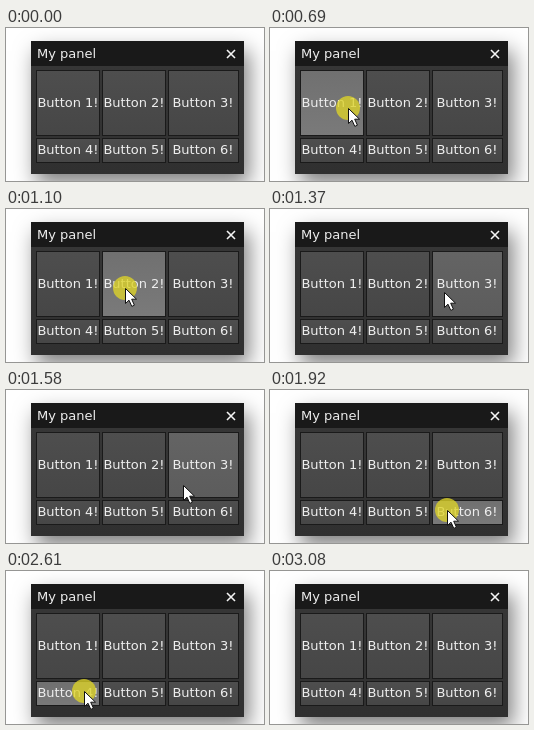
An HTML page with a canvas that plays this animation: 258 px wide and 153 px high, repeating every 3890 ms.

```html
<!DOCTYPE html>
<html lang="en">
<head>
<meta charset="utf-8">
<title>Button panel</title>
<style>
html, body { margin: 0; width: 100%; height: 100%; overflow: hidden; background: #fff; }
canvas { display: block; }
</style>
</head>
<body>
<canvas id="stage" width="258" height="153"></canvas>
<script>
const ctx = document.getElementById('stage').getContext('2d');
const LOOP = 3890;
const COLS = [[30, 64], [96, 64], [162, 71]];
const ROWS = [[42, 66], [110, 25]];
const buttons = ROWS.flatMap(([y, h], r) =>
  COLS.map(([x, w], c) => ({ x, y, w, h, label: `Button ${r * 3 + c + 1}!` })));

// Fill gradients: idle, hover, pressed
const FILLS = [['#4e4e4e', '#464646'], ['#646464', '#5c5c5c'], ['#707070', '#7a7a7a']];
const HOVER = 1, PRESS = 2, CLICK = 3;

// Pointer poses: start time, tip x, tip y, state (0 = pointer away)
const POSES = [
  [0, 0, 0, 0],
  [280, 89, 103, HOVER], [350, 82, 87, HOVER], [420, 78, 80, HOVER],
  [690, 78, 80, CLICK], [760, 78, 80, HOVER],
  [830, 98, 80, HOVER], [900, 118, 79, HOVER], [970, 119, 79, HOVER],
  [1040, 119, 79, CLICK], [1110, 119, 79, PRESS], [1170, 121, 79, HOVER],
  [1240, 145, 80, HOVER], [1310, 166, 82, HOVER], [1370, 174, 83, HOVER],
  [1440, 176, 83, CLICK], [1510, 176, 83, HOVER],
  [1580, 177, 95, HOVER], [1650, 177, 112, HOVER], [1720, 177, 120, HOVER],
  [1920, 177, 120, CLICK], [1990, 176, 120, HOVER],
  [2060, 156, 120, HOVER], [2130, 130, 120, HOVER], [2190, 118, 120, PRESS],
  [2260, 118, 120, CLICK], [2330, 116, 120, HOVER],
  [2400, 90, 120, HOVER], [2470, 82, 120, HOVER], [2540, 78, 120, HOVER],
  [2610, 78, 120, CLICK], [2750, 78, 120, HOVER],
  [3010, 112, 120, HOVER], [3080, 0, 0, 0]
];

const arrow = new Path2D('M.5 .5V15.5L4 12.2L6.8 18.4L9.4 17.2L6.7 11.2H11.5Z');

function rect(x, y, w, h, fill) {
  ctx.fillStyle = fill;
  ctx.fillRect(x, y, w, h);
}

function fade(y, h, [top, bottom]) {
  const g = ctx.createLinearGradient(0, y, 0, y + h);
  g.addColorStop(0, top);
  g.addColorStop(1, bottom);
  return g;
}

function text(str, x, y, align) {
  ctx.font = '13px "DejaVu Sans", sans-serif';
  ctx.textAlign = align;
  ctx.fillStyle = '#eee';
  ctx.fillText(str, x, y);
}

function drawPanel() {
  rect(0, 0, 258, 153, '#fff');
  ctx.save();
  ctx.shadowColor = 'rgba(0,0,0,.5)';
  ctx.shadowBlur = 20;
  ctx.shadowOffsetX = 5;
  ctx.shadowOffsetY = 10;
  rect(25, 13, 213, 133, '#333');
  ctx.restore();
  rect(25, 38, 213, 108, fade(38, 108, ['#363636', '#303030']));
  rect(25, 13, 213, 25, '#191919');
  text('My panel', 31, 30, 'left');
  ctx.strokeStyle = '#f4f4f4';
  ctx.lineWidth = 1.6;
  ctx.stroke(new Path2D('M221 22L229 30M229 22L221 30'));
}

function drawButton({ x, y, w, h, label }, level) {
  rect(x, y, w, h, '#1a1a1a');
  rect(x + 1, y + 1, w - 2, h - 2, fade(y, h, FILLS[level]));
  text(label, x + Math.floor(w / 2), y + Math.floor(h / 2) + 4, 'center');
}

function drawPointer(x, y, state) {
  if (state === CLICK) {
    ctx.fillStyle = 'rgba(222,212,40,.78)';
    ctx.beginPath();
    ctx.arc(x, y, 12, 0, 7);
    ctx.fill();
  }
  ctx.save();
  ctx.translate(x, y);
  ctx.fillStyle = '#fff';
  ctx.strokeStyle = '#111';
  ctx.lineWidth = 1;
  ctx.fill(arrow);
  ctx.stroke(arrow);
  ctx.restore();
}

function draw() {
  const t = performance.now() % LOOP;
  const [, x, y, state] = POSES.findLast(p => p[0] <= t);
  drawPanel();
  for (const b of buttons) {
    const over = x >= b.x && x < b.x + b.w && y >= b.y && y < b.y + b.h;
    drawButton(b, over ? Math.min(state, PRESS) : 0);
  }
  if (state) drawPointer(x, y, state);
  requestAnimationFrame(draw);
}
draw();
</script>
</body>
</html>
```
